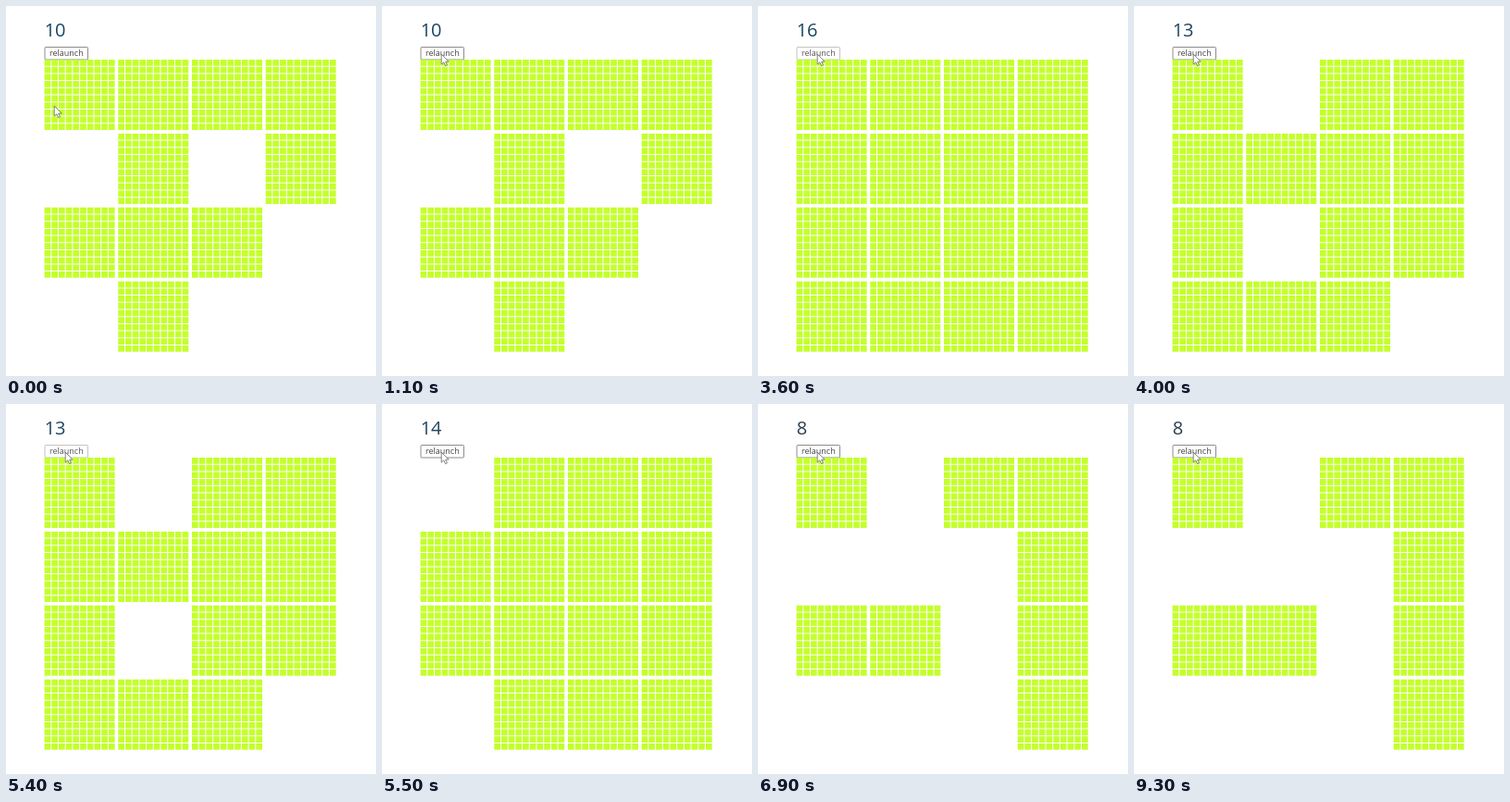
Write an HTML page that moves like this. It is 400x400 px and loops after 9.8 s.

```html
<!DOCTYPE html>
<html lang="en">
<head>
<meta charset="utf-8">
<title>Relaunch grid</title>
<style>
  html, body { margin: 0; width: 100%; height: 100%; overflow: hidden; background: #fff; }
  svg { display: block; width: 400px; height: 400px; }
  text { font-family: "Open Sans", "Noto Sans", sans-serif; }
</style>
</head>
<body>
<svg viewBox="0 0 400 400">
  <defs><path id="tile" fill="#c4ff2c"/></defs>
  <text id="count" x="41.7" y="33.3" font-size="20"></text>
  <rect id="button" x="42" y="44.5" width="46.5" height="13.5" rx=".8" fill="#fff"/>
  <text id="label" x="47" y="54.3" font-size="9">relaunch</text>
  <g id="grid"></g>
  <path id="cursor" d="M0 0V11.2L2.6 8.8L4.4 12.7L6.2 11.9L4.5 8.1H8Z"
    fill="#fff" stroke="#666" stroke-width=".8" stroke-linejoin="round"/>
</svg>
<script>
const LOOP = 9800, STEP = 100;
const $ = id => document.getElementById(id);

// Each layout lists its 16 cells row by row.
const layouts = [
  { at: 0, cells: '1111010111100100', ink: '#174564' },
  { at: 1400, cells: '1111111111111111', ink: '#174564' },
  { at: 3800, cells: '1011111110111110', ink: '#204560' },
  { at: 5500, cells: '0111111111110111', ink: '#204560' },
  { at: 6900, cells: '1011000111010001', ink: '#2c3e50' }
];
const presses = [[1200, 1400], [3600, 3800], [5400, 5500], [6700, 6900]];

// A tile is a 10 by 10 block of small squares.
let d = '';
for (let i = 0; i < 100; i++)
  d += `M${(i % 10 * 7.7).toFixed(1)} ${(Math.floor(i / 10) * 7.7).toFixed(1)}h6.7v6.7h-6.7z`;
$('tile').setAttribute('d', d);

const tiles = Array.from({ length: 16 }, (_, i) => {
  const use = document.createElementNS('http://www.w3.org/2000/svg', 'use');
  use.setAttribute('href', '#tile');
  use.setAttribute('x', 41.6 + i % 4 * 79.7);
  use.setAttribute('y', 58 + Math.floor(i / 4) * 79.9);
  return $('grid').appendChild(use);
});

const bezier = (a, b, c, p) => (1 - p) ** 2 * a + 2 * p * (1 - p) * b + p * p * c;

function draw(now) {
  const t = Math.floor(now % LOOP / STEP) * STEP;
  const { cells, ink } = layouts.filter(l => l.at <= t).pop();
  tiles.forEach((tile, i) => tile.setAttribute('visibility', cells[i] === '1' ? 'visible' : 'hidden'));
  $('count').textContent = cells.replaceAll('0', '').length;
  $('count').setAttribute('fill', ink);

  const pressed = presses.some(([from, to]) => t >= from && t < to);
  $('button').setAttribute('stroke', pressed ? '#c4c4c4' : '#8c8c8c');
  $('label').setAttribute('fill', pressed ? '#555' : '#444');

  const p = Math.min(t / 1100, 1);
  const x = bezier(52.2, -13, 64.2, p), y = bezier(108, 88, 52, p);
  $('cursor').setAttribute('transform', `translate(${x} ${y})`);
}

const start = performance.now();
function frame() {
  draw(performance.now() - start);
  requestAnimationFrame(frame);
}
frame();
</script>
</body>
</html>
```
